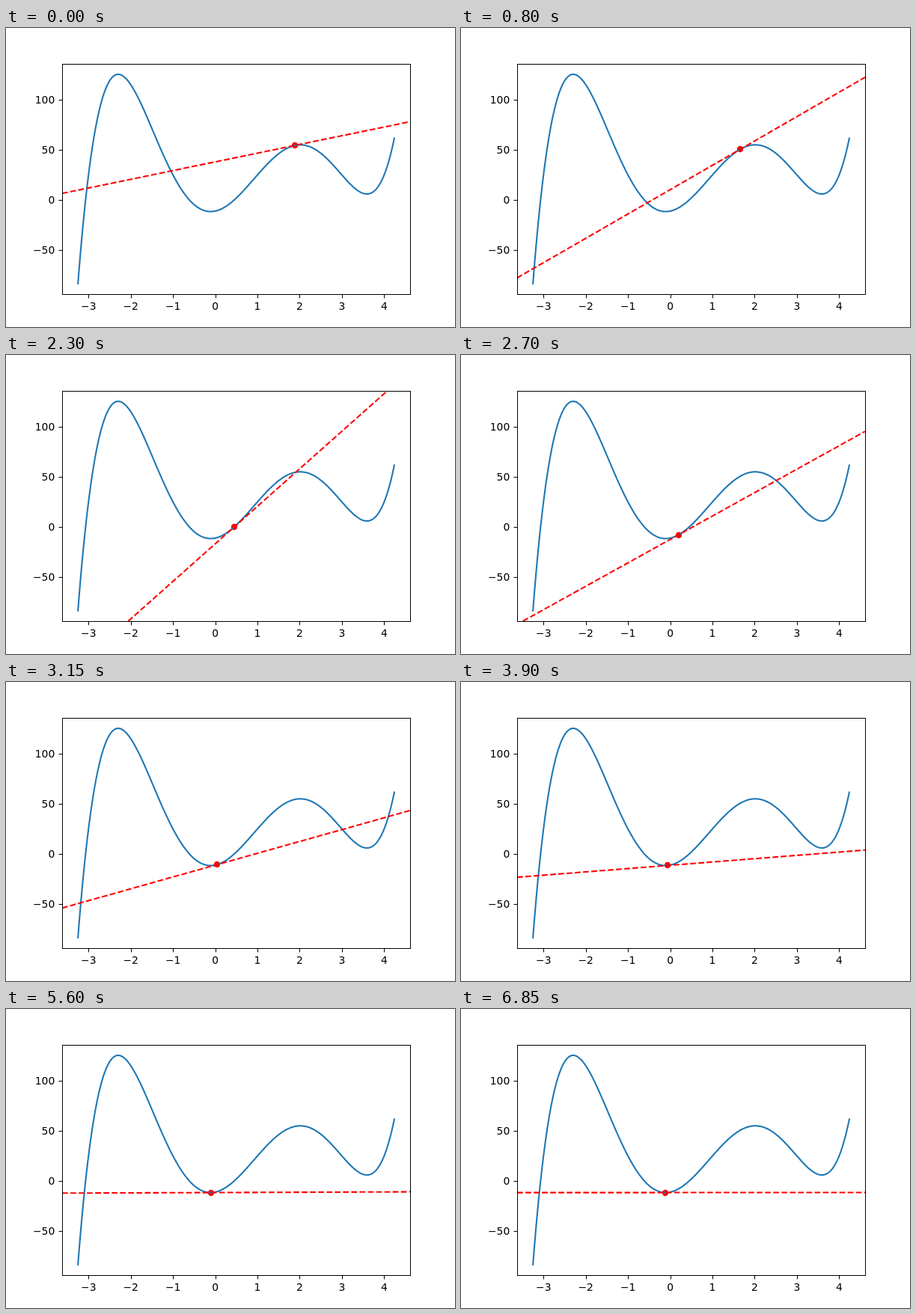
Animation of 600 by 400 pixels, one loop 7.2 s. Source, as an HTML page with a canvas:

```html
<!DOCTYPE html>
<html lang="en">
<head>
<meta charset="utf-8">
<title>Gradient descent</title>
<style>
  html, body { margin: 0; width: 100%; height: 100%; overflow: hidden; background: #fff; }
  canvas { display: block; width: 600px; height: 400px; }
</style>
</head>
<body>
<canvas id="plot" width="600" height="400"></canvas>
<script>
const ctx = document.getElementById('plot').getContext('2d');

const LOOP = 7200, STEP_MS = 50, STEPS = 138;
const RATE = 0.001, START = 1.9;
const PT = 100 / 72; // pixels per point
const box = { l: 75, t: 48, r: 540, b: 356 };

const f = x => x ** 5 - 4 * x ** 4 - 10 * x ** 3 + 40 * x ** 2 + 9 * x - 11;
const slope = x => 5 * x ** 4 - 16 * x ** 3 - 30 * x ** 2 + 80 * x + 9;

// Sample the curve; the view adds a 5% margin on every side
const curve = [];
for (let i = 0; i < 750; i++) {
  const x = -3.25 + i * 0.01;
  curve.push([x, f(x)]);
}
const range = values => {
  const lo = Math.min(...values), hi = Math.max(...values);
  const pad = (hi - lo) * 0.05;
  return [lo - pad, hi + pad];
};
const [xLo, xHi] = range(curve.map(p => p[0]));
const [yLo, yHi] = range(curve.map(p => p[1]));
const px = x => box.l + (x - xLo) / (xHi - xLo) * (box.r - box.l);
const py = y => box.b - (y - yLo) / (yHi - yLo) * (box.b - box.t);

const path = [];
for (let i = 0, x = START; i < STEPS; i++) {
  x -= RATE * slope(x);
  path.push(x);
}

function stroke(points, color, width, dash = [], cap = 'butt') {
  ctx.beginPath();
  points.forEach(([x, y]) => ctx.lineTo(x, y));
  ctx.strokeStyle = color;
  ctx.lineWidth = width;
  ctx.lineCap = cap;
  ctx.lineJoin = 'round';
  ctx.setLineDash(dash);
  ctx.stroke();
}

function drawDot(x) {
  ctx.fillStyle = '#f00';
  ctx.beginPath();
  ctx.arc(Math.round(px(x)), Math.round(py(f(x))), 4.15, 0, Math.PI * 2);
  ctx.fill();
}

// Tangent runs between the two inner crossings with the view limits
function drawTangent(x0) {
  const m = slope(x0), y0 = f(x0);
  const at = x => [x, y0 + m * (x - x0)];
  const cross = y => [x0 + (y - y0) / m, y];
  const ends = [at(xLo), at(xHi), cross(yLo), cross(yHi)]
    .sort((a, b) => a[0] - b[0])
    .slice(1, 3)
    .map(([x, y]) => [px(x), py(y)]);
  stroke(ends, '#f00', 1.5 * PT, [5.55 * PT, 2.4 * PT]);
}

function drawAxes() {
  const { l, t, r, b } = box;
  ctx.setLineDash([]);
  ctx.lineJoin = 'miter';
  ctx.lineWidth = 1;
  ctx.strokeStyle = ctx.fillStyle = '#000';
  ctx.strokeRect(l + 0.5, t + 0.5, r - l, b - t);
  ctx.font = `${10 * PT}px "DejaVu Sans", sans-serif`;
  ctx.textBaseline = 'alphabetic';
  const label = v => String(v).replace('-', '\u2212');

  ctx.textAlign = 'center';
  for (let v = -3; v <= 4; v++) {
    const x = Math.round(px(v)) + 0.5;
    stroke([[x, b + 0.5], [x, b + 5.5]], '#000', 1);
    ctx.fillText(label(v), px(v), 377);
  }
  ctx.textAlign = 'right';
  for (let v = -50; v <= 100; v += 50) {
    const y = Math.round(py(v)) + 0.5;
    stroke([[l + 0.5, y], [l - 4.5, y]], '#000', 1);
    ctx.fillText(label(v), l - 7 * PT, Math.round(py(v) + 5));
  }
}

function draw(time) {
  const step = Math.min(STEPS - 1, Math.floor((time % LOOP) / STEP_MS));
  const x = path[step];
  ctx.fillStyle = '#fff';
  ctx.fillRect(0, 0, 600, 400);
  ctx.save();
  ctx.beginPath();
  ctx.rect(box.l, box.t, box.r - box.l, box.b - box.t);
  ctx.clip();
  drawDot(x);
  stroke(curve.map(([u, v]) => [px(u), py(v)]), '#1f77b4', 1.5 * PT, [], 'square');
  drawTangent(x);
  ctx.restore();
  drawAxes();
}

function tick() {
  draw(performance.now());
  requestAnimationFrame(tick);
}
tick();
</script>
</body>
</html>
```
